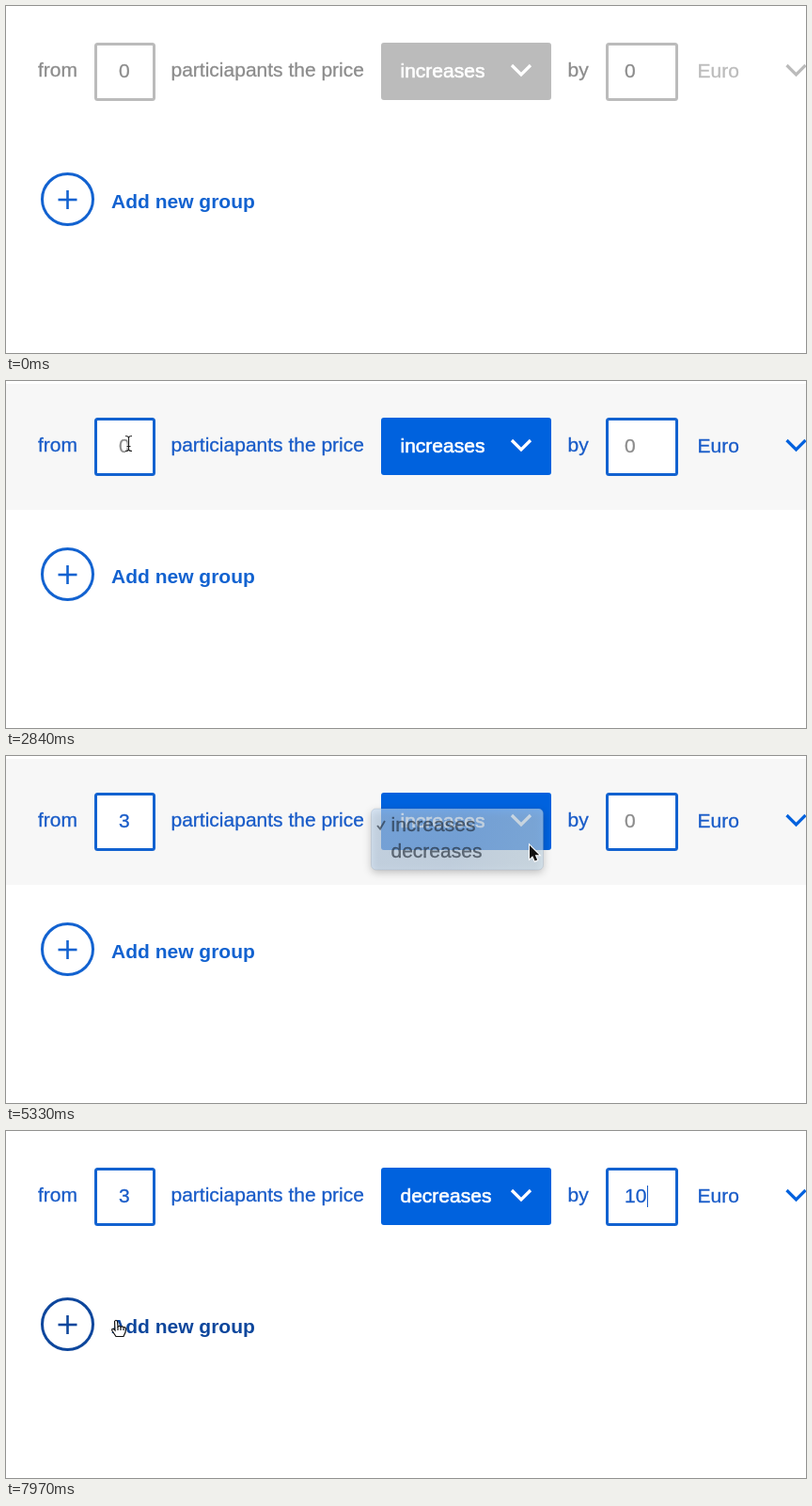
Animation of 851 by 369 pixels, one loop 8000 ms. Source, as an HTML page with a canvas:

```html
<!DOCTYPE html>
<html lang="en">
<head>
<meta charset="utf-8">
<title>Group price form</title>
<style>
  html, body { margin: 0; width: 100%; height: 100%; overflow: hidden; background: #fff; }
  canvas { display: block; }
</style>
</head>
<body>
<canvas id="stage" width="851" height="369"></canvas>
<script>
const ctx = document.getElementById('stage').getContext('2d');
const LOOP = 8000, START = 500, TICK = 30;
const FONT = '21px "Liberation Sans", Arial, sans-serif';

const GREY = [140, 140, 140], SILVER = [187, 187, 187];
const BLUE = [24, 91, 200], ACCENT = [0, 98, 222], LINE = [18, 98, 208], NAVY = [13, 70, 156];

const rgb = c => `rgb(${c.map(Math.round).join()})`;
const mix = (a, b, k) => rgb(a.map((v, i) => v + (b[i] - v) * k));
const ramp = (t, a, b) => Math.min(1, Math.max(0, (t - a) / (b - a)));
const within = (t, a, b) => t >= a && t < b;

// Pointer path: time, x, y
const PATH = [
  [500, 8, 76], [590, 143.5, 82], [710, 143.5, 82], [890, 153.5, 94], [1010, 153.5, 91],
  [1610, 153.5, 91], [1790, 130.5, 66.5], [4070, 130.5, 66.5], [4100, 215, 65],
  [4280, 571, 52], [4580, 571, 52], [4820, 544, 88], [4970, 557, 95],
  [5450, 557, 95], [5720, 665, 70], [7430, 665, 70], [7610, 590, 130],
  [7790, 280, 220], [7910, 135, 211], [7970, 117, 201]
];

const ARROW = new Path2D('M0 0V14.2L3.2 11.3L5.6 16.6L8.2 15.5L5.8 10.2H10.2Z');
const BEAM = new Path2D('M-3.5 -8Q-.5 -8 0 -6.5Q.5 -8 3.5 -8M0 -6.5V6.5M-3.5 8Q-.5 8 0 6.5Q.5 8 3.5 8M-2 3H2');
const HAND = new Path2D('M-1.5 1.5Q0 -1 1.5 1.5L2 7Q4 5.5 5 7.5Q7 6 8 8Q10 7 10.5 9.5L10 13L8 17.5H0L-4 11.5Q-5 8.5 -2.5 9.5L-1 11Z');
const KNUCKLES = new Path2D('M2 7V11M5 8V11M8 8.5V11');

function pointer(t) {
  const i = PATH.findIndex(p => p[0] >= t);
  if (i < 0) return PATH[PATH.length - 1].slice(1);
  if (i === 0) return PATH[0].slice(1);
  const [a, b] = [PATH[i - 1], PATH[i]], k = ramp(t, a[0], b[0]);
  return [a[1] + (b[1] - a[1]) * k, a[2] + (b[2] - a[2]) * k];
}

function text(str, x, y, color, weight = 0.3, bold = '') {
  ctx.font = bold + FONT;
  ctx.fillStyle = ctx.strokeStyle = color;
  ctx.lineWidth = weight;
  ctx.fillText(str, x, y);
  if (weight) ctx.strokeText(str, x, y);
}

function line(color, width, ...pts) {
  ctx.strokeStyle = color;
  ctx.lineWidth = width;
  ctx.beginPath();
  pts.forEach(([x, y]) => ctx.lineTo(x, y));
  ctx.stroke();
}

function box(x, y, w, h, r) {
  ctx.beginPath();
  ctx.roundRect(x, y, w, h, r);
}

function field(x, w, color) {
  box(x + 1.5, 40.5, w - 3, 59, 2);
  ctx.fillStyle = '#fff';
  ctx.fill();
  ctx.strokeStyle = color;
  ctx.lineWidth = 3;
  ctx.stroke();
}

const chevron = (x, color) => line(color, 3.2, [x - 10, 63], [x, 73], [x + 10, 63]);
const caret = x => line(rgb(BLUE), 1, [x + 0.5, 58], [x + 0.5, 81]);

function row(t, hovered) {
  const hover = ramp(t, 1610, 1790);
  const focus = t < 2540 ? 0 : t < 2570 ? 0.4 : t < 2840 ? 0.8 : 1;
  const label = mix(GREY, BLUE, hover);
  const border = mix(SILVER, LINE, focus);

  if (hovered) {
    ctx.fillStyle = mix([255, 255, 255], [247, 247, 247], hover);
    ctx.fillRect(0, 3, 851, 134);
  }
  text('from', 34, 75, label);
  text('particiapants the price', 175.5, 75, label);
  text('by', 597.5, 75, label);
  text('Euro', 735.5, 76, mix(SILVER, BLUE, focus));
  chevron(840.5, mix(SILVER, ACCENT, hover));

  field(94, 65, border);
  const typed = t >= 3740;
  text(typed ? '3' : '0', 120, 76, rgb(typed ? BLUE : GREY));
  if (within(t, 2480, 2840) || within(t, 3230, 3740)) caret(127);
  if (within(t, 3740, 4580)) caret(132);

  box(399, 39, 181, 61, 3);
  ctx.fillStyle = mix(SILVER, ACCENT, focus);
  ctx.fill();
  text(t < 5390 ? 'increases' : 'decreases', 419.5, 76, '#fff', 0.6);
  chevron(548, '#fff');

  field(638, 77, border);
  const amount = t < 6800 ? '0' : t < 6980 ? '1' : '10';
  text(amount, 658, 76, rgb(t < 6800 ? GREY : BLUE));
  if (within(t, 5720, 6080) || within(t, 6530, 6800)) caret(659);
  if (t >= 6800) caret(t < 6980 ? 671 : 682);
}

function menu(t, y) {
  const fade = 1 - ramp(t, 5270, 5420);
  if (t < 4580 || fade === 0) return;
  const blinkOff = within(t, 5180, 5240) || t >= 5270;
  const active = blinkOff ? -1 : y > 88 ? 1 : 0;
  const ink = i => active === i ? '#fff' : '#1b2430';

  ctx.save();
  ctx.globalAlpha = fade;
  const glass = ctx.createLinearGradient(388, 56, 572, 121);
  glass.addColorStop(0, '#c3daf2');
  glass.addColorStop(0.5, '#bfd6ee');
  glass.addColorStop(1, '#cde2f1');
  ctx.save();
  ctx.shadowColor = 'rgba(0,0,0,.38)';
  ctx.shadowBlur = 9;
  ctx.shadowOffsetY = 3;
  box(388.5, 56, 183, 65, 5);
  ctx.fillStyle = glass;
  ctx.fill();
  ctx.restore();
  ctx.strokeStyle = 'rgba(90,115,145,.4)';
  ctx.lineWidth = 0.7;
  ctx.stroke();
  if (active >= 0) {
    ctx.fillStyle = '#0057d2';
    ctx.fillRect(388.5, 60 + active * 28, 183, 28);
  }
  line(ink(0), 1.9, [395, 74], [398, 77.5], [403, 69]);
  text('increases', 409.5, 80, ink(0));
  text('decreases', 409.5, 108, ink(1));
  ctx.restore();
}

function addButton(hovered) {
  const color = rgb(hovered ? NAVY : LINE);
  ctx.strokeStyle = color;
  ctx.lineWidth = 3;
  ctx.beginPath();
  ctx.arc(65.5, 205.5, 27, 0, Math.PI * 2);
  ctx.stroke();
  line(color, 2.6, [55.5, 206], [75.5, 206]);
  line(color, 2.6, [65.5, 196], [65.5, 216]);
  text('Add new group', 112, 215, color, 0, 'bold ');
}

function outlined(path, width) {
  ctx.fillStyle = '#fff';
  ctx.fill(path);
  ctx.strokeStyle = '#111';
  ctx.lineWidth = width;
  ctx.stroke(path);
}

function cursor(t, x, y, onAdd) {
  const shown = within(t, 500, 3740) || within(t, 4100, 6800) || t >= 7460;
  if (!shown) return;
  const inField = y > 39 && y < 101 && (within(x, 94, 159) || within(x, 638, 715));
  ctx.save();
  ctx.translate(x, y);
  if (onAdd) {
    outlined(HAND, 1.2);
    ctx.stroke(KNUCKLES);
  } else if (inField) {
    ctx.strokeStyle = 'rgba(255,255,255,.7)';
    ctx.lineWidth = 2.4;
    ctx.stroke(BEAM);
    ctx.strokeStyle = '#222';
    ctx.lineWidth = 1.2;
    ctx.stroke(BEAM);
  } else {
    ctx.strokeStyle = '#fff';
    ctx.lineWidth = 2;
    ctx.stroke(ARROW);
    ctx.fillStyle = '#111';
    ctx.fill(ARROW);
  }
  ctx.restore();
}

function draw(t) {
  const [x, y] = pointer(t);
  const onAdd = t >= 7460 && x < 265 && within(y, 177, 235);
  ctx.fillStyle = '#fff';
  ctx.fillRect(0, 0, 851, 369);
  row(t, y < 137);
  addButton(onAdd);
  menu(t, y);
  cursor(t, x, y, onAdd);
}

const origin = performance.now();
function tick() {
  const t = (performance.now() - origin) % LOOP;
  draw(t < START ? 0 : START + Math.floor((t - START) / TICK) * TICK);
  requestAnimationFrame(tick);
}
tick();
</script>
</body>
</html>
```
